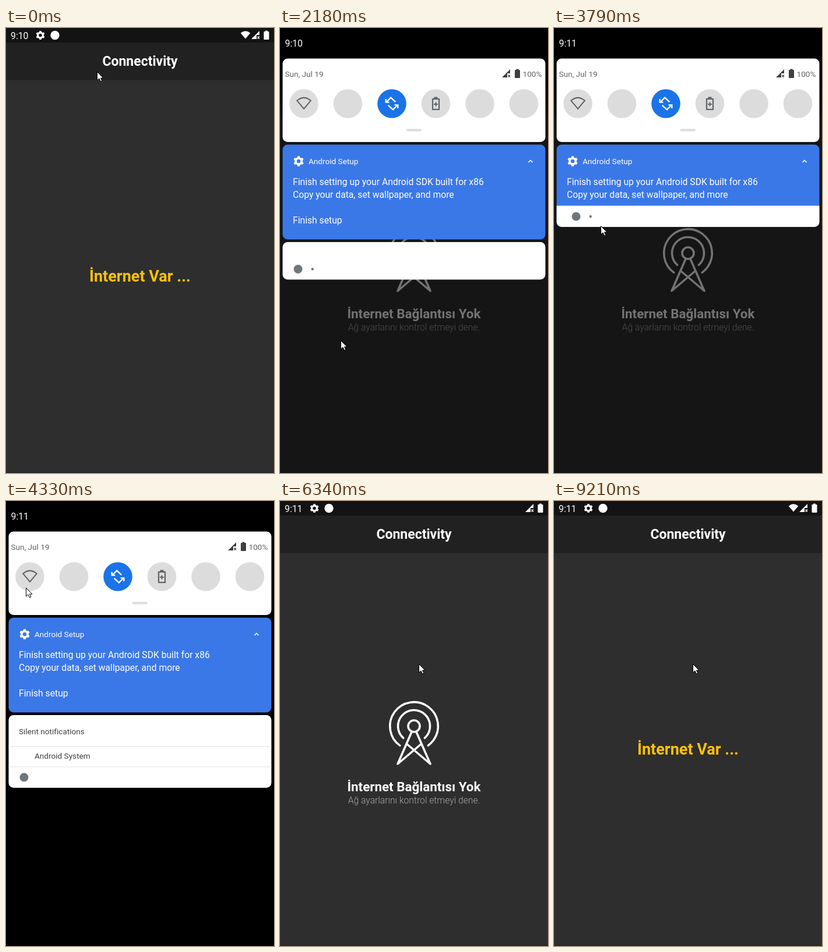
Write an HTML page with a canvas that moves like this. It is 460x765 px and loops after 9380 ms.

```html
<!DOCTYPE html>
<html lang="tr">
<head>
<meta charset="utf-8">
<title>Connectivity</title>
<style>
  html, body { margin: 0; width: 100%; height: 100%; overflow: hidden; background: #2e2e2e; }
  canvas { display: block; }
</style>
</head>
<body>
<canvas id="stage" width="460" height="765"></canvas>
<script>
const ctx = document.getElementById('stage').getContext('2d');
const LOOP = 9380, STEP = 77.4, FULL = 493, SHELF = 36.5;
const WIFI_OFF = 1520, WIFI_ON = 4400, WIFI_FOUND = 8900, WIFI_READY = 9130, ONLINE = 9210;
const BLUE = '#1a73e8', GRAY = '#5f6368', TILE = '#dcdcdc';
const LEFT = 4.5, WIDTH = 451;

// Keyframes: [time, value, ...]
const POINTER = [
  [70, 156, 75], [420, 125, 4], [1000, 104, 560], [1080, 100, 605], [1180, 98, 608],
  [1480, 32, 124], [1600, 32, 124], [1950, 104, 600], [2020, 104, 590], [2550, 104, 390],
  [2780, 104, 110], [2900, 104, 110], [3150, 88, 4], [3790, 80, 340], [3870, 78, 520],
  [3960, 76, 620], [4350, 32, 124], [4480, 32, 124], [4800, 24, 380], [4870, 25, 370],
  [4950, 30, 290], [5330, 174, 266], [6080, 174, 266], [6340, 238, 280]
];
const SHADE = [
  [420, 0], [930, FULL], [2000, FULL], [2010, 470], [2330, 390], [2550, 61], [2780, 0],
  [3150, 0], [3790, 342], [3870, FULL], [4940, FULL], [4950, 405], [5250, 20], [5330, 0]
];

const clamp = v => Math.max(0, Math.min(1, v));

function track(keys, t) {
  const next = keys.findIndex(k => k[0] > t);
  if (next === 0) return keys[0].slice(1);
  if (next < 0) return keys[keys.length - 1].slice(1);
  const a = keys[next - 1], b = keys[next];
  const p = (t - a[0]) / (b[0] - a[0]);
  return a.slice(1).map((v, i) => v + (b[i + 1] - v) * p);
}

function text(str, x, y, size, color, weight = 400, align = 'left') {
  ctx.font = `${weight} ${size}px Roboto, sans-serif`;
  ctx.textAlign = align;
  ctx.fillStyle = color;
  ctx.fillText(str, x, y);
}

function rect(x, y, w, h, color, radius = 0) {
  ctx.fillStyle = color;
  ctx.beginPath();
  ctx.roundRect(x, y, w, h, radius);
  ctx.fill();
}

function disc(x, y, r, color) {
  ctx.fillStyle = color;
  ctx.beginPath();
  ctx.arc(x, y, r, 0, 7);
  ctx.fill();
}

function line(points, color, width) {
  ctx.strokeStyle = color;
  ctx.lineWidth = width;
  ctx.beginPath();
  points.forEach(([x, y]) => ctx.lineTo(x, y));
  ctx.stroke();
}

function at(x, y, draw) {
  ctx.save();
  ctx.translate(x, y);
  draw();
  ctx.restore();
}

function gear(x, y, r, color) {
  at(x, y, () => {
    ctx.fillStyle = color;
    ctx.beginPath();
    for (let i = 0; i < 6; i++) {
      const a = (i + .5) * Math.PI / 3;
      for (const [da, k] of [[-.3, .78], [-.22, 1], [.22, 1], [.3, .78]])
        ctx.lineTo(Math.cos(a + da) * r * k, Math.sin(a + da) * r * k);
    }
    ctx.closePath();
    ctx.moveTo(r * .36, 0);
    ctx.arc(0, 0, r * .36, 0, Math.PI * 2);
    ctx.fill('evenodd');
  });
}

function wifi(x, y, w, color, outline) {
  at(x, y, () => {
    ctx.beginPath();
    ctx.moveTo(0, .4 * w);
    ctx.lineTo(-.5 * w, -.2 * w);
    ctx.quadraticCurveTo(0, -.62 * w, .5 * w, -.2 * w);
    ctx.closePath();
    ctx.fillStyle = ctx.strokeStyle = color;
    ctx.lineWidth = 2;
    outline ? ctx.stroke() : ctx.fill();
  });
}

function signal(x, y, color) {
  at(x, y, () => {
    ctx.fillStyle = color;
    ctx.beginPath();
    [[-7, 7], [7, -7], [7, 0], [2, 0], [2, 7]].forEach(p => ctx.lineTo(...p));
    ctx.fill();
    line([[3.5, 2.5], [7, 6.5]], color, 1.2);
    line([[7, 2.5], [3.5, 6.5]], color, 1.2);
  });
}

function battery(x, y, color) {
  rect(x - 4.5, y - 6, 9, 14, color, 1);
  rect(x - 2, y - 7.5, 4, 2, color);
}

function antenna() {
  ctx.strokeStyle = '#fff';
  ctx.lineWidth = 3.6;
  ctx.lineCap = 'round';
  ctx.lineJoin = 'round';
  for (const [r, gap] of [[10, 0], [27.5, 42], [41.3, 36]]) {
    ctx.beginPath();
    ctx.arc(230, 387, r, (90 + gap) * Math.PI / 180, (450 - gap) * Math.PI / 180);
    ctx.stroke();
  }
  for (const s of [-1, 1])
    line([[230 + 4 * s, 397], [230 + 28 * s, 452], [230 - 12 * s, 418]], '#fff', 3.6);
  ctx.lineCap = 'butt';
  ctx.lineJoin = 'miter';
}

function app(t, clock) {
  rect(0, 0, 460, 765, '#2e2e2e');
  rect(0, 89, 460, 1, '#272727');
  rect(0, 25, 460, 64, '#212121');
  rect(0, 0, 460, 25, '#131313');
  rect(0, 763, 460, 2, '#272727');
  text(clock, 8, 18.5, 15.8, '#fff');
  gear(59, 12.5, 7.7, '#fff');
  disc(84, 12.5, 7.7, '#fff');
  if (t < WIFI_OFF || t >= WIFI_FOUND)
    wifi(411, 12, 16.5, t >= WIFI_FOUND && t < WIFI_READY ? '#777' : '#fff');
  signal(428, 12, '#fff');
  battery(447, 12, '#fff');
  text('Connectivity', 230, 65, 23, '#fff', 700, 'center');
  if (t < WIFI_OFF || t >= ONLINE) {
    text('İnternet Var ...', 230, 436, 27, '#ffc107', 700, 'center');
  } else {
    antenna();
    text('İnternet Bağlantısı Yok', 230, 499, 22.4, '#fff', 700, 'center');
    text('Ağ ayarlarını kontrol etmeyi dene.', 230, 520, 15.66, '#a8a8a8', 300, 'center');
  }
}

function rotateIcon(x, y) {
  at(x, y, () => {
    ctx.scale(1.15, 1.15);
    for (let half = 0; half < 2; half++) {
      line([[5.5, -2.5], [-1.6, -9], [-8.2, -2.4]], '#fff', 2);
      line([[-9, -7], [-9, -2], [-4, -2]], '#fff', 2);
      ctx.rotate(Math.PI);
    }
  });
}

function saverIcon(x, y) {
  ctx.strokeStyle = GRAY;
  ctx.lineWidth = 2.2;
  ctx.strokeRect(x - 5.5, y - 8, 11, 18);
  rect(x - 3, y - 11.5, 6, 3, GRAY);
  rect(x - 3.5, y, 7, 2, GRAY);
  rect(x - 1, y - 2.5, 2, 7, GRAY);
}

function wifiTile(connected, connecting) {
  if (connected || connecting) wifi(41, 130, 26, '#fff');
  else wifi(41, 129.5, 23.5, GRAY, true);
  if (connecting) wifi(41, 131, 18, BLUE);
}

function quickSettings(t, clock) {
  text(clock, 8.5, 31.5, 15.8, '#fff');
  ctx.save();
  ctx.shadowColor = 'rgba(0,0,0,.3)';
  ctx.shadowBlur = 3;
  rect(LEFT, 52.5, WIDTH, 143.5, '#fff', 8.5);
  ctx.restore();
  text('Sun, Jul 19', 8.5, 83.5, 13.6, GRAY);
  text('100%', 416.5, 83.5, 13.6, GRAY);
  if (t < WIFI_OFF) wifi(371, 78, 16.5, '#3c4043');
  signal(388, 78, '#3c4043');
  battery(407.5, 78, '#3c4043');

  const connected = t < WIFI_OFF, connecting = t >= WIFI_ON;
  for (let i = 0; i < 6; i++) {
    const on = i === 2 || (i === 0 && (connected || connecting));
    disc(41 + 75.5 * i, 130, 24.8, on ? BLUE : TILE);
  }
  wifiTile(connected, connecting);
  rotateIcon(192, 130);
  saverIcon(267.5, 130);
  rect(216.5, 173.5, 26.5, 4, TILE, 2);
}

function notifications(height, shift) {
  const shelfTop = height - SHELF;
  const bottom = height - shift, cut = shelfTop - shift;
  ctx.save();
  ctx.translate(0, shift);
  if (bottom > 201) rect(LEFT, 200.5, WIDTH, Math.min(363.5, bottom) - 200.5, '#3b78e7', 8.5);
  if (cut > 363) rect(LEFT, 368, WIDTH, bottom - 368, '#fff', 8.5);
  ctx.beginPath();
  ctx.rect(0, 0, 460, cut);
  ctx.clip();
  gear(32, 229, 9, '#fff');
  text('Android Setup', 49, 234, 13.6, '#fff');
  line([[426.5, 231], [430, 227.5], [433.5, 231]], '#fff', 1.6);
  text('Finish setting up your Android SDK built for x86', 22, 270, 15.7, '#fff');
  text('Copy your data, set wallpaper, and more', 22, 292, 15.7, '#fff');
  text('Finish setup', 22, 336, 15.7, '#fff');
  if (cut > 405) {
    text('Silent notifications', 22, 400.5, 13.6, '#3c4043');
    rect(LEFT, 421.5, WIDTH, 1, '#e0e0e0');
    text('Android System', 49, 442.5, 13.6, '#3c4043');
  }
  ctx.restore();

  // The shelf collects the icons of everything below the fold.
  if (cut <= 363) {
    const alpha = clamp(.93 + (height - 61) / 1000);
    rect(LEFT, shelfTop, WIDTH, SHELF, `rgba(255,255,255,${alpha})`, [0, 0, 8.5, 8.5]);
  }
  if (height >= 457) rect(LEFT, shelfTop, WIDTH, 1, '#e0e0e0');
  const y = height - 18, step = 24.7;
  let x = 31 + 16 * clamp((405 - height) / 144);
  if (height < 275) {
    gear(x, y, 7.5, '#777');
    x += step;
  }
  disc(x, y, 7.5, '#6f777c');
  if (height < 457) disc(x + step, y, 2.2, '#777');
}

function shade(t, height, clock) {
  const shift = Math.min(0, height - 229);
  const scrim = height >= FULL ? 1 : .55 * clamp((height - 61) / 230);
  rect(0, 0, 460, 765, `rgba(0,0,0,${scrim})`);
  at(0, shift, () => {
    const fade = ctx.createLinearGradient(0, 90, 0, 165);
    fade.addColorStop(0, '#000');
    fade.addColorStop(1, 'transparent');
    rect(0, 0, 460, 165, fade);
  });
  notifications(height, shift);
  at(0, shift, () => quickSettings(t, clock));
}

function pointer(x, y) {
  at(x, y, () => {
    ctx.beginPath();
    [[.5, .5], [.5, 15], [4, 11.8], [6.4, 17], [8.8, 16], [6.5, 11], [11, 11]]
      .forEach(p => ctx.lineTo(...p));
    ctx.closePath();
    ctx.fillStyle = '#fff';
    ctx.fill();
    ctx.strokeStyle = '#000';
    ctx.lineWidth = 1;
    ctx.stroke();
  });
}

const start = performance.now();

// The screen refreshes about 13 times a second and holds each pose.
function heldTime() {
  const t = (performance.now() - start) % LOOP;
  return Math.floor(Math.floor((t + 8) / STEP) * STEP / 10) * 10;
}

function frame() {
  const t = heldTime();
  const clock = t < 2780 ? '9:10' : '9:11';
  const [height] = track(SHADE, t);
  app(t, clock);
  if (height > 0) shade(t, height, clock);
  pointer(...track(POINTER, t).map(Math.round));
  requestAnimationFrame(frame);
}
frame();
</script>
</body>
</html>
```
